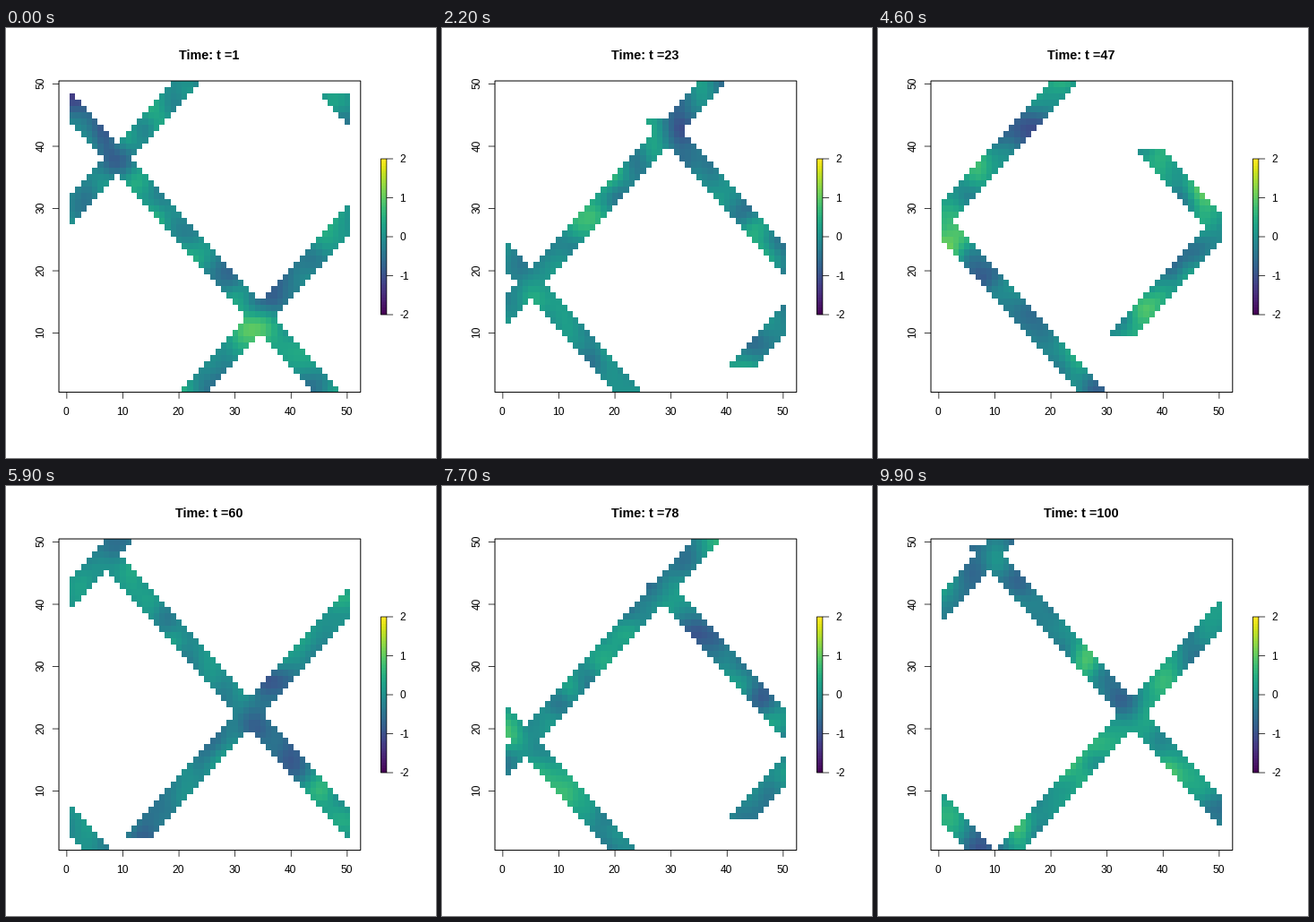
Recreate the animation shown at these times as a matplotlib script. Size 480x480 px, loop 10000 ms.

```python
import numpy as np
import matplotlib.pyplot as plt
from matplotlib.animation import FuncAnimation
from matplotlib.patches import Rectangle

SIZE, N, STEPS = 480, 50, 100
LEFT, RIGHT, TOP, BOTTOM = 59.04, 395.8, 59.04, 406.56
BAR = (418.4, 146.0, 6.5, 174.0)  # x, y, width, height

# Gaussian blur that keeps unit variance
cells = np.arange(N)
blur = np.exp(-((cells[:, None] - cells) / 1.9) ** 2 / 2)
blur /= np.sqrt((blur ** 2).sum(1, keepdims=True))


def px(x):
    return 67.87 + 6.26 * x


def py(y):
    return BOTTOM - 6.9504 * (y - 0.5)


def swath(t):
    """Cells seen by one ascending and one descending pass, five cells wide."""
    seen = np.zeros((N, N), bool)
    t %= 50
    lap, up = divmod(13 + 10 * t, N)
    down = (57 - 10 * t) % N + 1
    for x0, y0, step in [(up, 1 + lap, 1), (down, 48 - (t - 1) // 5, -1)]:
        for k in range(N + 2):
            for x in range(x0 + k - 2, x0 + k + 3):
                # leaving on the right re-enters on the left, one row up
                wrap = (x - 1) // N
                col, row = x - wrap * N, y0 + step * k + wrap
                if 1 <= row <= N:
                    seen[row - 1, col - 1] = True
    return seen


def field(t):
    """Smooth random surface, the same for a given time step."""
    rng = np.random.default_rng(700 + t)
    return 0.36 * (blur @ rng.normal(size=(N, N)) @ blur.T) - 0.04


plt.rcParams["font.family"] = "Liberation Sans"
fig = plt.figure(figsize=(SIZE / 72, SIZE / 72), dpi=72, facecolor="white")
ax = fig.add_axes([0, 0, 1, 1])
ax.set_xlim(0, SIZE)
ax.set_ylim(SIZE, 0)
ax.axis("off")


def line(x, y):
    ax.plot(x, y, color="black", lw=0.75, solid_capstyle="butt", snap=False)


def frame(x, y, w, h, lw):
    ax.add_patch(Rectangle((x, y), w, h, fill=False, ec="black", lw=lw,
                           snap=False, zorder=3))


def label(x, y, s, **kw):
    return ax.text(x, y, s, **{"fontsize": 12, "va": "baseline", **kw})


def mesh(x, y, z):
    # whole-pixel edges keep the cells crisp
    return ax.pcolormesh(np.round(x), np.round(y), z, cmap="viridis",
                         vmin=-2, vmax=2, antialiased=False,
                         edgecolors="none", snap=False)


edges = np.arange(N + 1) + 0.5
grid = mesh(px(edges), py(edges), np.ma.masked_all((N, N)))
frame(LEFT, TOP, RIGHT - LEFT, BOTTOM - TOP, 1)

for v in range(0, 51, 10):
    line([px(v)] * 2, [BOTTOM, BOTTOM + 7.2])
    label(px(v) - 0.8, 432.2, str(v), ha="center")
    if v:
        line([LEFT - 7.2, LEFT], [py(v)] * 2)
        label(42.3, py(v) - 0.8, str(v), ha="center", rotation=90,
              rotation_mode="anchor")

bx, by, bw, bh = BAR
mesh([bx, bx + bw], np.linspace(by + bh, by, 65),
     np.linspace(-2, 2, 64)[:, None])
frame(bx, by, bw, bh, 0.75)
for v in range(-2, 3):
    y = by + bh * (2 - v) / 4
    line([bx + bw, bx + bw + 7.2], [y, y])
    label(439.2, y + 4.2, str(v))

title = label((LEFT + RIGHT) / 2 - 0.8, 35, "", ha="center", fontsize=14.4,
              weight="bold")


def update(i):
    t = i + 1
    grid.set_array(np.ma.array(field(t), mask=~swath(t)))
    title.set_text(f"Time: t ={t}")
    return grid, title


anim = FuncAnimation(fig, update, frames=STEPS, interval=100, repeat=True,
                     repeat_delay=0, blit=False)
plt.show()
```
